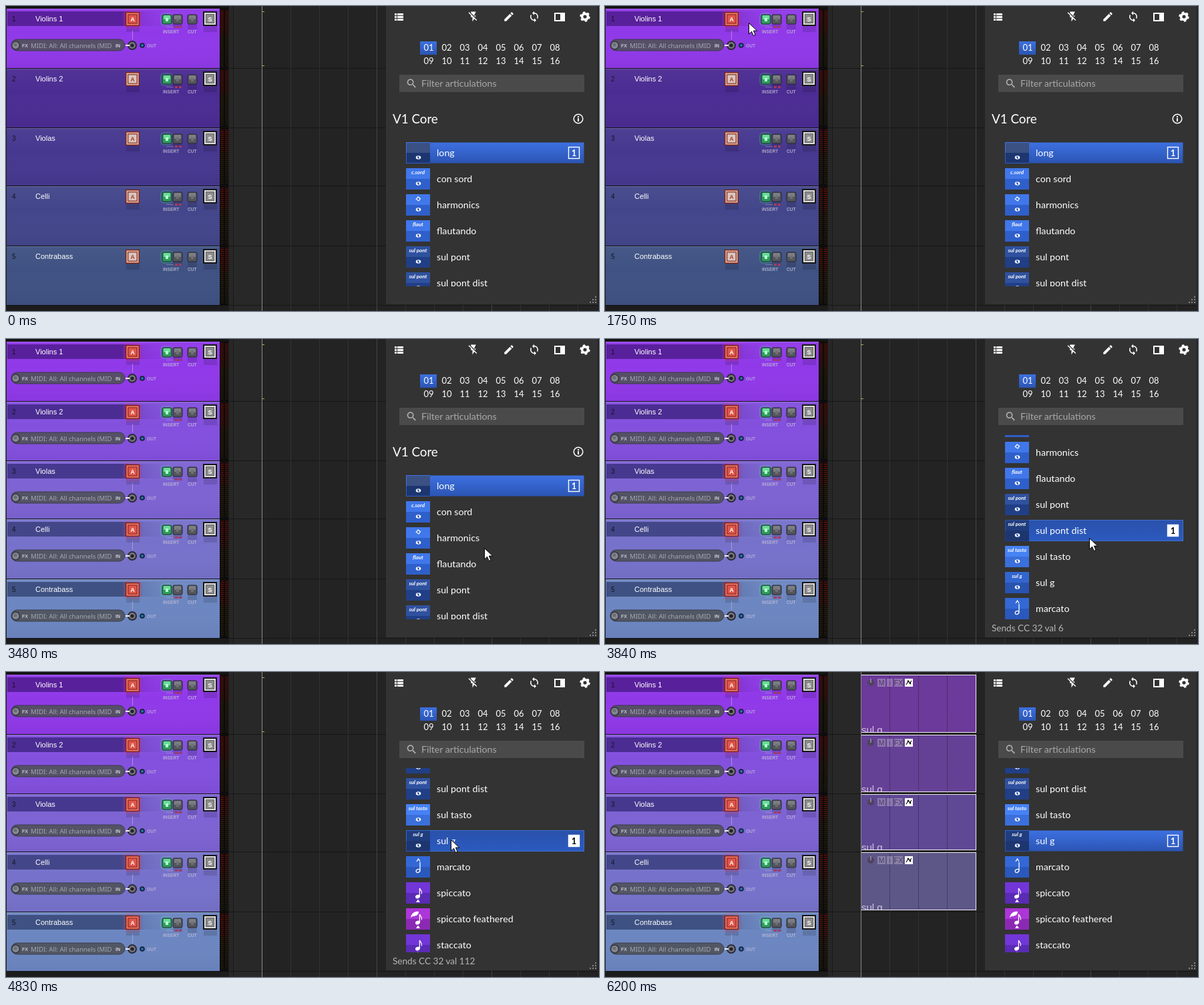
Animation of 888x457 px, one loop 8 s. Source, as an HTML page:

```html
<!DOCTYPE html>
<html lang="en">
<head>
<meta charset="utf-8">
<title>Articulation panel</title>
<style>
html, body { margin: 0; width: 100%; height: 100%; overflow: hidden; background: #232323; }
svg { display: block; width: 888px; height: 457px; }
svg svg { width: auto; height: auto; }
text { white-space: pre; }
.ui { font-family: Lato, "Open Sans", sans-serif; }
.arial { font-family: "Liberation Sans", Arial, sans-serif; }
.tiny { font-family: "Noto Sans", sans-serif; }
.armed, .track .strip { display: none; }
.track .sel { display: none; }
.track.selected .sel, .track.selected .strip { display: inline; }
.track.live .armed { display: inline; }
.track.live .idle { display: none; }
.row .bar, .row .badge, .row .dim { display: none; }
.row.on .bar, .row.on .badge, .row.on .dim,
.row.hover .bar, .row.hover .badge, .row.hover .dim { display: inline; }
.badge rect { fill: none; stroke: #fff; stroke-width: 1.4; }
.badge text { fill: #fff; }
.row.hover .bar { fill: url(#barHover); stroke: #3f6fd0; }
.row.hover .badge rect { fill: #fff; }
.row.hover .badge text { fill: #000; }
</style>
</head>
<body>
<svg id="stage" viewBox="0 0 888 457"></svg>
<script>
const STEP = 90, LOOP = 8000;

const rect = (x, y, w, h, fill, extra = '') =>
  `<rect x="${x}" y="${y}" width="${w}" height="${h}" fill="${fill}" ${extra}/>`;
const label = (x, y, str, size, fill = '#fff', cls = 'ui', extra = '') =>
  `<text x="${x}" y="${y}" font-size="${size}" fill="${fill}" class="${cls}" ${extra}>${str}</text>`;
const path = (d, fill, extra = '') => `<path d="${d}" fill="${fill}" ${extra}/>`;
const disc = (x, y, r, fill, extra = '') => `<circle cx="${x}" cy="${y}" r="${r}" fill="${fill}" ${extra}/>`;
const group = (body, extra = '') => `<g ${extra}>${body}</g>`;
const range = (n, fn) => Array.from({ length: n }, (_, i) => fn(i)).join('');
const gradient = (id, stops, dir = 'x2="0" y2="1"') => `<linearGradient id="${id}" ${dir}>` +
  stops.map(([at, color, alpha = 1]) => `<stop offset="${at}" stop-color="${color}" stop-opacity="${alpha}"/>`).join('') +
  '</linearGradient>';
const clip = (id, shape) => `<clipPath id="${id}">${shape}</clipPath>`;
const MID = 'text-anchor="middle"', BOLD = 'font-weight="700"';

// name, top, height, idle colour, selected colour, strip colour, item colour
const tracks = [
  ['Violins 1', 4, 89, '#552097', '#9039e9', '#59209c', '#6c3a9a'],
  ['Violins 2', 94, 88, '#4b2c93', '#8350de', '#4b2c93', '#654196'],
  ['Violas', 183, 86, '#46388f', '#7d63d3', '#46388f', '#5f4894'],
  ['Celli', 270, 89, '#43468a', '#7672cb', '#43478a', '#5c5787'],
  ['Contrabass', 360, 88, '#3f5283', '#6c86c1', '#3e5182', '']
];

// name, icon top, icon bottom, icon label, glyph, controller value
const rows = [
  ['long', '#3f72e6', '#2f5cc4', '', 'whole', 1],
  ['con sord', '#4077ea', '#2f5fca', 'c.sord', 'whole', 2],
  ['harmonics', '#4077ea', '#2f5fca', '', 'diamond', 3],
  ['flautando', '#4077ea', '#2f5fca', 'flaut', 'whole', 4],
  ['sul pont', '#2f519f', '#213f86', 'sul pont', 'whole', 5],
  ['sul pont dist', '#2f519f', '#213f86', 'sul pont', 'whole', 6],
  ['sul tasto', '#4682f4', '#3a6fdc', 'sul tasto', 'whole', 7],
  ['sul g', '#3266cf', '#2854b0', 'sul g', 'whole', 112],
  ['marcato', '#3368d6', '#2a58bd', '', 'half', 9],
  ['spiccato', '#7236d8', '#5a2bb4', '', 'wedge', 10],
  ['spiccato feathered', '#ac36d8', '#8c29b4', '', 'feather', 11],
  ['staccato', '#7236d8', '#5a2bb4', '', 'dot', 12]
];

function wholeNote(x, y) {
  return `<ellipse cx="${x}" cy="${y}" rx="3.8" ry="2.7" fill="#fff"/>` +
    `<ellipse cx="${x}" cy="${y}" rx="1.2" ry="2" fill="#2d57b4" transform="rotate(-30 ${x} ${y})"/>`;
}

function glyph(kind) {
  const white = 'stroke="#fff" stroke-width="1.3"';
  if (kind === 'whole') return wholeNote(617.5, 7);
  if (kind === 'diamond')
    return wholeNote(617.5, 7) + path('M617 -12l3.5 2.7-2.5 3.3-3.8-2.6z', 'none', 'stroke="#fff" stroke-width="1.2"');
  if (kind === 'half')
    return path('M620 5V-7M615 -8l2.5-4 2.5 4', 'none', white) +
      `<ellipse cx="617" cy="6" rx="3" ry="2.3" fill="none" ${white} transform="rotate(-25 617 6)"/>`;
  const note = '<ellipse cx="616.5" cy="5.5" rx="3.6" ry="2.7" fill="#fff" transform="rotate(-25 616.5 5.5)"/>' +
    path('M619.4 5V-7c1 3 4.5 4 3 8.5', 'none', white);
  if (kind === 'dot') return note + disc(617, 12, 1.5, '#fff');
  return note + path('M617 9.5l3 4.5h-6z', '#fff') +
    (kind === 'feather' ? path('M606 -2c1-6 6-10 12-9 0 5-4 7-9 7z', '#fff') : '');
}

function rowMarkup([name, top, bottom, tag, kind], i) {
  return group(
    rect(599.5, -15.5, 266, 31, 'url(#bar)', 'class="bar"') +
    rect(599, -16, 36, 16, top) + rect(599, 0, 36, 16, bottom) +
    group(rect(600, -15, 35, 15, i ? '#203d7e' : '#3b5183') + rect(600, 0, 35, 15, '#1d3670'), 'class="dim"') +
    label(617, -7, tag, 8, '#fff', 'ui', `${MID} ${BOLD} font-style="italic"`) + glyph(kind) +
    label(645, 5, name, 14.2) +
    group(rect(842.5, -8.5, 16, 17, '') + label(850.5, 4.5, '1', 13, '', 'ui', `${MID} ${BOLD}`), 'class="badge"'),
    `class="row" transform="translate(0 ${220 + 39 * i})"`);
}

function smallKey(x, lit) {
  return rect(x, 9, 14, 14, lit ? '#2e9c5c' : '#54565c', 'rx="2" stroke="#252530"') +
    rect(x + 2, 10, 10, 6, lit ? '#7ff0ae' : '#8a8c92', 'rx="1" opacity=".75"') +
    rect(x + 5, 14, 4, 5, lit ? '#b4ffd0' : '#6e7076');
}

function armKey(ring, inner, text, cls) {
  return group(rect(179, 5, 21, 21, '#7a1c14', 'rx="1"') + rect(181.5, 7.5, 16, 16, 'none', `stroke="${ring}" stroke-width="2.5"`) +
    rect(183, 9, 13, 13, inner, 'stroke="#7c1c16" stroke-width=".8"') +
    label(189.5, 18.7, 'A', 8.5, text, 'arial', `${MID} ${BOLD}`), `class="${cls}"`);
}

function inputRow() {
  const steel = '#a5a9b2';
  return rect(8, 46, 170, 17, '#50525a', 'rx="8.5" stroke="#35363f" opacity=".9"') +
    disc(14.5, 55, 7, '#3c3e46') + disc(14.5, 55, 5, '#868992') + disc(14, 54, 2.5, '#6a6d76') +
    label(24, 57.5, 'FX', 7, '#c0c4cc', 'arial', BOLD) +
    label(37, 58.5, 'MIDI: All: All channels (MID', 9.6, steel, 'tiny') +
    label(164, 57.5, 'IN', 7, '#d0d2d8', 'arial', BOLD) +
    rect(189, 33, 1, 13, '#c8c0dc', 'opacity=".55"') +
    disc(189, 55, 7, '#2b2a36') + disc(189, 55, 5, '#77767e') + disc(189, 55, 2.6, '#22222a') +
    rect(179, 54, 6, 2, '#eee') + disc(204, 55, 3.8, '#15203c') + disc(204, 55, 2, '#2477a8') +
    label(211, 57.5, 'OUT', 6.6, '#c6bedc', 'arial', `${BOLD} opacity=".75"`);
}

function trackMarkup([name, y, h, idle, selected, strip], i) {
  const caption = (x, str) => label(x, 37, str, 6.6, '#c2bfd4', 'arial', `${BOLD} opacity=".8"`);
  return group(
    rect(1, 0, 319, h, idle) + rect(1, 0, 319, h, selected, 'class="sel"') + rect(1, 0, 319, h, 'url(#sheen)') +
    group(rect(2, 4, 240, 22, strip, 'mask="url(#fade)"'), 'class="strip"') +
    rect(1, 0, 319, 1, '#fff', 'opacity=".18"') + rect(1, h, 332, 1, '#101014') +
    label(9, 19, i + 1, 10, '#17131f', 'arial') + label(44, 19, name, 11, '#fff', 'arial') +
    rect(180, 26, 20, 9, '#000', 'opacity=".13"') + rect(296, 26, 20, 9, '#000', 'opacity=".13"') +
    rect(250, 23, 14, 6, '#000', 'opacity=".13"') + rect(272, 23, 14, 8, '#000', 'opacity=".13"') +
    armKey('#d8a894', '#d8c8c0', '#b33022', 'idle') +
    group(rect(175, 1, 29, 29, '#ff3050', 'rx="8" opacity=".16"') + armKey('#ea7464', '#e0564a', '#fff', '') + inputRow(), 'class="armed"') +
    rect(231, 6, 19, 20, '#3dff9a', 'rx="6" opacity=".18"') +
    smallKey(234, true) + smallKey(250, false) + smallKey(272, false) +
    rect(253, 26, 4, 3, '#a83a5e') + rect(259, 26, 4, 3, '#a83a5e') + rect(240, 27, 11, 1, '#c2bfd4', 'opacity=".4"') +
    caption(235, 'INSERT') + caption(272, 'CUT') +
    rect(295, 4, 21, 22, '#17171a') + rect(297, 6, 17, 18, '#dcdcdc') + rect(299.5, 8.5, 12, 13, '#8c8c8c', 'stroke="#666"') +
    label(305.5, 18.5, 'S', 9, '#fff', 'arial', `${MID} ${BOLD}`) +
    rect(320, 0, 13, h, '#0c0b0b') +
    rect(321, 2, 5, h - 4, 'url(#meter)') + rect(328, 2, 5, h - 4, 'url(#meter)') +
    range(Math.floor(h / 3), k => rect(320, 3 * k, 13, 1, '#0c0b0b')),
    `class="track" transform="translate(0 ${y})"`);
}

function itemMarkup([, y, h, , , , color], i) {
  const chip = (x, w, str) => rect(x, 6, w, 12, '#c0b6cc', 'opacity=".45"') +
    label(x + w / 2, 16, str, 10.5, '#4c3c66', 'arial', MID);
  const bottom = h - 3;
  return group(
    rect(383.5, .5, 172, bottom, color, 'stroke="#f0ecf4"') +
    range(3, k => path(`M${426.5 + 43 * k} 1V${bottom}`, 'none', 'stroke="#2b1f3a" stroke-dasharray="2 1" opacity=".7"')) +
    disc(398, 12, 5, '#4e4360') + path('M398 12V6', 'none', 'stroke="#ada0bc" stroke-width="1.3"') +
    chip(408, 12, 'M') + chip(422, 9, 'i') + chip(433, 13, 'FX') +
    rect(449, 6, 12, 12, '#fff') + path('M451 15l3-5 3 2 2-3', 'none', 'stroke="#111" stroke-width="1.2"') +
    disc(454, 10, 1.4, '#111') + disc(457, 13, 1.4, '#111') +
    clip(`cut${i}`, rect(384, 0, 60, bottom, '#fff')) +
    label(384, h - 1, 'sul g', 15, '#d3c4e2', 'arial', `clip-path="url(#cut${i})"`) +
    rect(383, 0, 1, h, '#8a8a8a'),
    `transform="translate(0 ${y})"`);
}

function arrangeMarkup() {
  return rect(0, 0, 888, 457, '#232323') + rect(0, 0, 334, 457, '#1c1c1c') + rect(334, 0, 7, 457, '#272727') +
    rect(340, 0, 1, 457, '#191919') + rect(341, 0, 42, 457, '#282828') + rect(0, 0, 334, 4, '#141414') +
    tracks.map(([, y, h]) => rect(334, y + h, 554, 1, '#161616')).join('') +
    range(12, k => path(`M${426.5 + 43 * k} 0V457`, 'none', `stroke="${k % 4 === 3 ? '#666' : '#414141'}" stroke-dasharray="1 1"`)) +
    rect(383, 0, 1, 457, '#8a8a8a') +
    [8, 89].map(y => rect(383, y, 4, 1, '#b3a968')).join('');
}

function panelMarkup() {
  const icon = (x, y, d, fill = '#fff') => path(d, fill, `transform="translate(${x - 9} ${y - 9}) scale(.75)"`);
  return rect(569, 0, 317, 447, '#333') + rect(886, 0, 2, 457, '#222') +
    range(3, k => rect(582, 11 + 4 * k, 3, 3, '#fff') + rect(586, 11 + 4 * k, 9, 3, '#fff')) +
    icon(700, 16, 'M3.27 3L2 4.27l5 5V13h3v9l3.58-6.14L17.73 20 19 18.73zM17 10h-4l4-8H7v2.18l8.46 8.46z') +
    icon(753, 16, 'M3 17.25V21h3.75L17.81 9.94l-3.75-3.75zM20.71 7.04c.39-.39.39-1.02 0-1.41l-2.34-2.34c-.39-.39-1.02-.39-1.41 0l-1.83 1.83 3.75 3.75z') +
    icon(791, 16, 'M12 4V1L8 5l4 4V6c3.31 0 6 2.69 6 6 0 1-.25 2-.7 2.8l1.46 1.46C19.5 15 20 13.6 20 12c0-4.42-3.58-8-8-8zm0 14c-3.31 0-6-2.69-6-6 0-1 .25-2 .7-2.8L5.24 7.74C4.5 9 4 10.4 4 12c0 4.42 3.58 8 8 8v3l4-4-4-4z') +
    rect(822, 11, 14, 11, 'none', 'stroke="#fff" stroke-width="2"') + rect(830, 11, 6, 11, '#fff') +
    disc(867, 16, 4.4, 'none', 'stroke="#fff" stroke-width="3.6"') +
    disc(867, 16, 6.6, 'none', 'stroke="#fff" stroke-width="2.2" stroke-dasharray="3.456"') +
    rect(620, 53, 25, 20, 'url(#bar)') +
    range(16, k => label(633 + 27 * (k % 8), k < 8 ? 67 : 87, String(k + 1).padStart(2, '0'), 13, '#fff', 'ui', MID)) +
    rect(589, 103, 277, 26, '#4a4a4a') +
    icon(607.5, 116, 'M15.5 14h-.79l-.28-.27C15.41 12.59 16 11.11 16 9.5 16 5.91 13.09 3 9.5 3S3 5.91 3 9.5 5.91 16 9.5 16c1.61 0 3.09-.59 4.23-1.57l.27.28v.79l5 5L20.5 19zm-6 0C7 14 5 12 5 9.5S7 5 9.5 5 14 7 14 9.5 12 14 9.5 14z', '#b4b4b4') +
    label(622, 121, 'Filter articulations', 14.2, '#a9a9a9') +
    group(group(
      label(579, 176, 'V1 Core', 18.8) + disc(857, 169, 6.8, 'none', 'stroke="#fff" stroke-width="1.5"') +
      rect(856, 165, 2, 2, '#fff') + rect(856, 168, 2, 5, '#fff') + rows.map(rowMarkup).join(''),
      'id="list"'), 'clip-path="url(#view)"') +
    label(579, 438, '', 13.6, '#b6b6b6', 'ui', 'id="status"') +
    range(3, r => range(r + 1, k => rect(882 - 4 * k, 435 + 4 * r, 2, 2, '#858585')));
}

const stage = document.getElementById('stage');
stage.innerHTML = '<defs>' +
  gradient('bar', [[0, '#3d70e0'], [1, '#2b55b4']]) +
  gradient('barHover', [[0, '#2a51ab'], [1, '#2b5ac0']]) +
  gradient('sheen', [[0, '#fff', .04], [.4, '#fff', 0], [1, '#000', .04]]) +
  gradient('meter', [[0, '#4a0d08'], [.35, '#3a110a'], [.5, '#241a0c'], [1, '#1a170d']]) +
  gradient('fadeOut', [[0, '#fff'], [.72, '#fff'], [.85, '#fff', .2], [1, '#fff', 0]], 'x2="1" y2="0"') +
  '<mask id="fade">' + rect(2, 4, 240, 22, 'url(#fadeOut)') + '</mask>' +
  clip('view', rect(569, 144, 317, 276, '#fff')) + '</defs>' +
  arrangeMarkup() + tracks.map(trackMarkup).join('') +
  group(tracks.slice(0, 4).map(itemMarkup).join(''), 'id="items"') + panelMarkup() +
  path('M.5 .5V17l4-3.8 2.8 6.3 2.8-1.2-2.8-6.2h5.4z', '#fff', 'id="pointer" stroke="#000"');

const byId = id => document.getElementById(id);
const list = byId('list'), status = byId('status'), items = byId('items'), pointer = byId('pointer');
const trackNodes = [...document.querySelectorAll('.track')], rowNodes = [...document.querySelectorAll('.row')];

const easeOut = power => p => 1 - (1 - p) ** power;
const easeInOut = p => p < .5 ? 2 * p * p : 1 - 2 * (1 - p) ** 2;
const progress = (t, start, steps) =>
  Math.min(steps, Math.max(0, Math.floor((t - start) / STEP) + 1)) / steps;

// start time, steps, end x, end y, easing
const moves = [
  [1120, 9, 217, 18, easeOut(2)],
  [1930, 10, 218, 428, easeInOut],
  [3300, 3, 716, 313, easeInOut],
  [3570, 2, 725, 298, easeOut(2)],
  [4380, 6, 666, 251, easeInOut],
  [5840, 5, 396, 487, p => p]
];

function pointerAt(t) {
  let x = 88, y = 552;
  for (const [start, steps, toX, toY, ease] of moves) {
    const p = ease(progress(t, start, steps));
    x += (toX - x) * p;
    y += (toY - y) * p;
  }
  return [x, y];
}

function draw(t) {
  const [x, y] = pointerAt(t);
  const scrolled = Math.round(240 * easeOut(3.4)(progress(t, 3840, 5)));
  const hovered = x > 599 && x < 866
    ? rows.findIndex((_, i) => Math.abs(220 + 39 * i - scrolled - y) <= 14) : -1;
  const chosen = t < 5200 ? 0 : 7;

  pointer.setAttribute('transform', `translate(${Math.round(x)} ${Math.round(y)})`);
  list.setAttribute('transform', `translate(0 ${-scrolled})`);
  rowNodes.forEach((node, i) => {
    node.classList.toggle('on', i === chosen);
    node.classList.toggle('hover', i === hovered);
  });
  trackNodes.forEach((node, i) => {
    node.classList.toggle('selected', !i || t >= 2930);
    node.classList.toggle('live', !i || t >= 3020);
  });
  status.textContent = hovered < 0 ? '' : `Sends CC 32 val ${rows[hovered][5]}`;
  items.style.display = t >= 5290 ? '' : 'none';
}

const began = performance.now();
function tick() {
  draw((performance.now() - began) % LOOP);
  requestAnimationFrame(tick);
}
tick();
</script>
</body>
</html>
```
